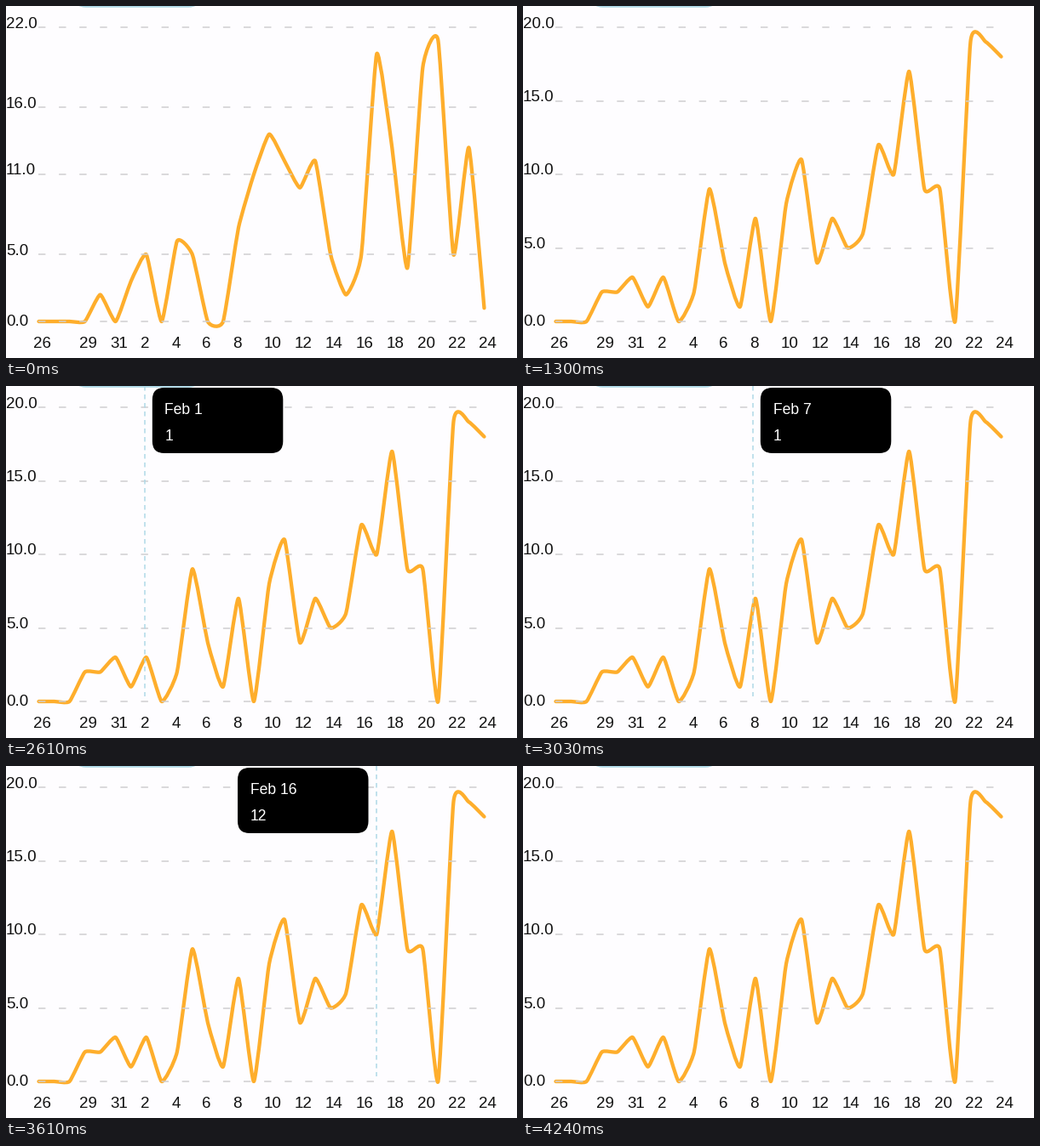
Write a matplotlib script that moves like this. It is 600 px wide and 414 px high and loops after 4270 ms.

```python
import numpy as np
import matplotlib.pyplot as plt
from matplotlib.animation import FuncAnimation
from matplotlib.patches import FancyBboxPatch, PathPatch
from matplotlib.path import Path

W, H, DPI = 600, 414, 96
PT = 72 / DPI                      # points per pixel
LOOP, TICK = 4270, 10              # ms

ORANGE, BLUE, GREY = "#feae2c", "#add8e6", "#cfced0"
LEFT, RIGHT, TOP, BASE = 38.5, 561.5, 25, 371
TENSION = 0.08
TIP_W, TIP_GAP, TIP_FLIP = 153.5, 9.3, 406
FONT = "Liberation Sans"

SWAP, DRAWN = 180, 1240            # new series arrives, line fully drawn
TIP_ON, TIP_OFF = 2000, 4240
DRAG_T = [2360, 2610, 3030, 3390, 3850, 4210]
DRAG_X = [110, 162.5, 269.5, 384.5, 489.7, 557]


class Series:
    """Daily counts with their axis ticks and smoothed outline."""

    def __init__(self, values):
        self.values = values
        self.top = max(values) + 1
        self.ticks = np.linspace(0, self.top, 5).astype(int)
        self.verts = self.outline()

    def y(self, value):
        return BASE - value * (BASE - TOP) / self.top

    def outline(self):
        last = len(self.values) - 1
        xs = np.linspace(LEFT, RIGHT, last + 1)
        p = np.column_stack([xs, self.y(np.array(self.values))])
        verts = [p[0]]
        for i in range(1, last + 1):
            before, after = p[max(i - 2, 0)], p[min(i + 1, last)]
            verts += [p[i - 1] + TENSION * (p[i] - before),
                      p[i] - TENSION * (after - p[i - 1]), p[i]]
        return np.array(verts)

    def path(self, n):
        return Path(self.verts[:3 * n + 1],
                    [Path.MOVETO] + [Path.CURVE4] * (3 * n))


# the two plotted series, one count per day from 26 January
OLD = Series([0] * 4 + [2, 0, 3, 5, 0, 6, 5, 0, 0, 7, 11, 14, 12,
                        10, 12, 5, 2, 5, 20, 13, 4, 19, 21, 5, 13, 1])
NEW = Series([0] * 3 + [2, 2, 3, 1, 3, 0, 2, 9, 4, 1, 7, 0, 8, 11,
                        4, 7, 5, 6, 12, 10, 17, 9, 9, 0, 19, 19, 18])
LAST = len(NEW.values) - 1
STEP = (RIGHT - LEFT) / LAST


def date(i):
    return ("Jan", 26 + i) if i < 6 else ("Feb", i - 5)


def label(x, mid, text="", size=18.7, color="#111111", z=5):
    return ax.text(x, mid + 0.355 * size, text, fontsize=size * PT, color=color,
                   family=FONT, ha="left", va="baseline", zorder=z)


def dashed(xs, ys, color, on, off, z):
    width = 1.5
    return ax.plot(xs, ys, color=color, lw=width * PT, zorder=z,
                   linestyle=(0, (on / width, off / width)),
                   dash_capstyle="butt")[0]


def rounded(x, y, w, h, color, z):
    box = FancyBboxPatch((x, y), w, h, boxstyle="round,pad=0,rounding_size=14",
                         fc=color, ec="none", zorder=z)
    return ax.add_patch(box)


fig = plt.figure(figsize=(W / DPI, H / DPI), dpi=DPI, facecolor="#fefdff")
ax = fig.add_axes([0, 0, 1, 1])
ax.set_xlim(0, W)
ax.set_ylim(H, 0)
ax.axis("off")

rounded(80, -40, 148, 41.8, BLUE, 1)

line = ax.add_patch(PathPatch(OLD.path(LAST), fill=False, ec=ORANGE,
                              lw=4.3 * PT, capstyle="round",
                              joinstyle="round", zorder=2))

grid = [dashed([LEFT - 0.5, RIGHT], [0, 0], GREY, 8.4, 15.7, 3)
        for _ in NEW.ticks]
y_labels = [label(0, 0) for _ in NEW.ticks]
for i in [0, *range(3, LAST + 1, 2)]:
    label(LEFT + i * STEP - 6.4, 395, str(date(i)[1]))

cursor = dashed([0, 0], [0, 365], BLUE, 5.5, 4.5, 6)
tip = rounded(0, 2, TIP_W, 77, "black", 7)
tip_day = label(0, 27, "", 17.5, "white", 8)
tip_value = label(0, 57.5, "", 17.5, "white", 8)


def set_axis(series):
    for rule, text, v in zip(grid, y_labels, series.ticks):
        y = series.y(v)
        rule.set_ydata([y, y])
        text.set_text(f"{v:.1f}")
        text.set_y(y + (0.5 if v else 5.5))


def set_tip(t):
    shown = TIP_ON <= t < TIP_OFF
    for part in (cursor, tip, tip_day, tip_value):
        part.set_visible(shown)
    if not shown:
        return
    x = np.interp(t, DRAG_T, DRAG_X)
    left = x + TIP_GAP if x < TIP_FLIP else x - TIP_GAP - TIP_W
    i = min(int((x - LEFT) / STEP), LAST)
    cursor.set_xdata([x, x])
    tip.set_x(left)
    tip_day.set_text("%s %d" % date(i))
    tip_value.set_text(str(NEW.values[i]))
    for text in (tip_day, tip_value):
        text.set_x(left + 14.7)


def draw(frame):
    t = frame * TICK
    series, shown = OLD, 1
    if t >= SWAP:
        series, shown = NEW, min((t - SWAP) / (DRAWN - SWAP), 1)
    n = int(LAST * shown)
    set_axis(series)
    line.set_visible(n > 0)
    line.set_path(series.path(n))
    set_tip(t)
    return []


anim = FuncAnimation(fig, draw, frames=LOOP // TICK, interval=TICK,
                     init_func=lambda: draw(0), repeat=True, repeat_delay=0,
                     blit=False)
plt.show()
```
